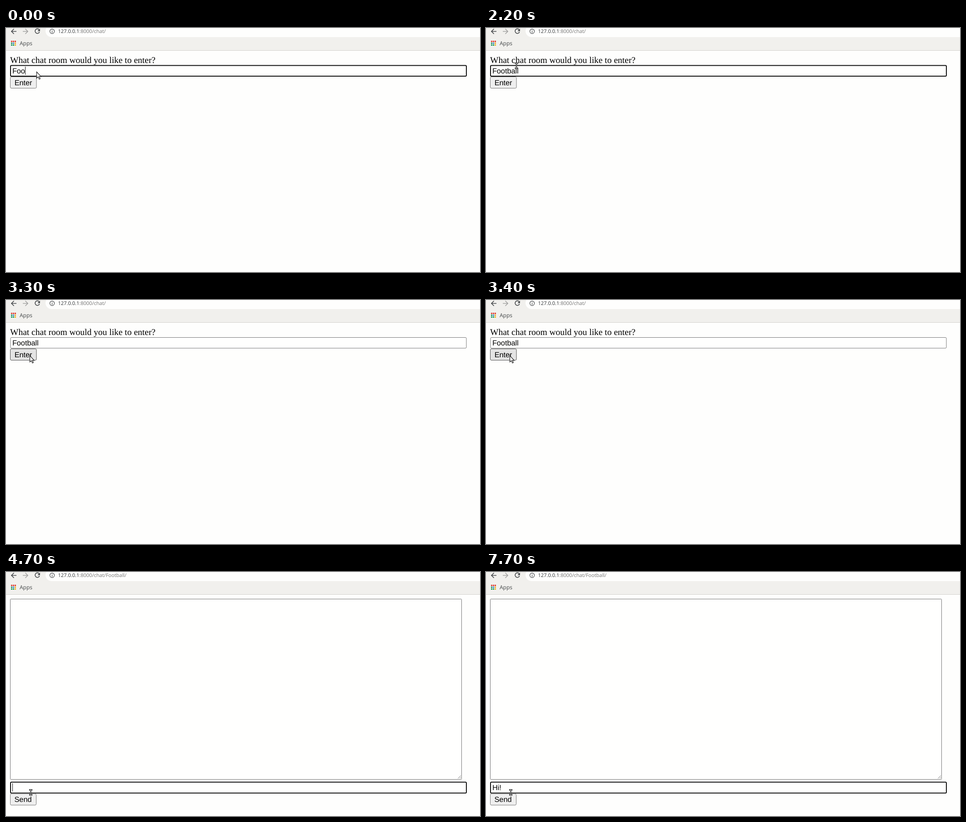
An HTML page that plays this animation: 1043 px wide and 537 px high, repeating every 8 s.

```html
<!DOCTYPE html>
<html lang="en">
<head>
<meta charset="utf-8">
<title>Chat room</title>
<style>
  html, body { margin: 0; width: 100%; height: 100%; overflow: hidden; background: #fefefd; }
  svg { display: block; width: 1043px; height: 537px; text-rendering: geometricPrecision; }
  .ui { font: 16.25px "Liberation Sans", Arial, sans-serif; }
  .bar { font: 11.05px "Open Sans", "Noto Sans", sans-serif; fill: #747474; }
  .box { fill: #fffffe; stroke: #767676; }
  .box.hover { stroke: #4f4f4f; }
  .box.focus { stroke: #101010; stroke-width: 2; }
  .button { fill: #efefef; stroke: #767676; }
  .button.hover { fill: #e4e4e4; stroke: #4f4f4f; }
  .icon { fill: none; stroke: #474a4d; stroke-width: 1.7; }
</style>
</head>
<body>
<svg viewBox="0 0 1043 537">
  <rect width="1043" height="49" fill="#f1f0ed"/>
  <path d="M0 49.5H1043" stroke="#d2d1ce"/>
  <rect x="87" y="-7" width="1000" height="27" rx="13.5" fill="#fefefd"/>
  <path class="icon" d="M23 7.5H12.5M17.5 2 12 7.5 17.5 13"/>
  <path class="icon" d="M37 7.5H47.5M42.500 2 48 7.5 42.500 13" style="stroke:#a3a3a2"/>
  <path class="icon" d="M73 3.800A5 5 0 1 0 73.800 8.500"/>
  <path d="M74.800 1.500V7H69.300Z" fill="#474a4d"/>
  <circle class="icon" cx="101.500" cy="7.300" r="5" style="stroke-width:1.200"/>
  <path class="icon" d="M101.500 4.200V5.600M101.500 6.600V10.500" style="stroke-width:1.300"/>
  <text class="bar" x="114.500" y="11"><tspan fill="#303336">127.0.0.1</tspan>:8000/chat/<tspan id="room"></tspan></text>
  <g id="apps"></g>
  <text class="bar" x="30" y="38.300" style="font-size:12px;fill:#45484a">Apps</text>

  <g id="lobby">
    <text x="9" y="77" style="font:19.5px 'Liberation Serif',Times,serif">What chat room would you like to enter?</text>
    <rect id="roomBox" x="10" y="82.500" width="1003" height="23.500" rx="2"/>
    <rect id="enter" x="9.500" y="107.500" width="57.500" height="25" rx="2.500"/>
    <text class="ui" x="18.700" y="126">Enter</text>
  </g>
  <g id="chat">
    <rect id="log" x="9.500" y="59.500" width="993" height="397" rx="1"/>
    <path d="M994.500 454.500 1001 448M998.500 454.500 1001 452" stroke="#777"/>
    <rect class="box focus" x="10" y="462.500" width="1003" height="24" rx="2"/>
    <rect class="button" x="9.500" y="488" width="57" height="25" rx="2.500"/>
    <text class="ui" x="18.500" y="506.300">Send</text>
  </g>
  <text id="typed" class="ui" x="13.900"></text>
  <rect id="caret" width="1" height="18" fill="#111"/>
  <path id="arrow" d="M.5.5V14.500L3.700 11.600 6.100 16.800 8.300 15.800 6 10.800H10Z" fill="#fff" stroke="#1c1c1c" stroke-width="1.200"/>
  <g id="beam" fill="none">
    <path d="M-3.500-5.500H3.500M0-5.500V5.500M-3.500 5.500H3.500" stroke="#222" stroke-width="2.800"/>
    <path d="M-2.600-5.500H2.600M0-5.500V5.500M-2.600 5.500H2.600" stroke="#ddd" stroke-width=".9"/>
  </g>
</svg>
<script>
const $ = id => document.getElementById(id);
const LOOP = 8000, PAGE_CHANGE = 3500;

// Each entry takes effect at its time and holds until the next.
const typing = [
  [0, "Foo"], [300, "Foot"], [1000, "Footb"], [1100, "Footba"], [1700, "Football"],
  [3500, ""], [5800, "H"], [6300, "Hi"], [7200, "Hi!"]
];
const caretShown = [
  [0, true], [2200, false], [2700, true], [3300, false], [3500, true], [4000, false],
  [4600, true], [5100, false], [5700, true], [7000, false], [7200, true], [7700, false]
];
const pointer = [
  [0, ["arrow", 67, 96]], [300, ["beam", 69, 98.5]],
  [2200, ["beam", 67, 83]], [2300, ["beam", 63, 91]], [2400, ["arrow", 58, 108]],
  [2500, ["arrow", 56, 117]], [2600, ["arrow", 55, 122]], [2700, ["arrow", 54, 128]],
  [2800, ["arrow", 53, 131]], [2900, ["arrow", 52, 126]], [3000, ["arrow", 52, 122]],
  [3500, ["beam", 53.5, 125.5]], [3800, ["beam", 153, 152]], [4000, ["beam", 56, 479]],
  [4200, ["beam", 54.5, 468]], [4400, ["beam", 54.5, 479]], [4700, ["beam", 54.5, 485]]
];
const at = (track, t) => track.findLast(([start]) => t >= start)[1];
const show = (id, on) => $(id).style.display = on ? "" : "none";
const setClass = (id, name) => $(id).setAttribute("class", name);

const red = "#dc4437", green = "#219b62", blue = "#3f83d8", yellow = "#eeb32f";
[red, red, red, green, blue, yellow, green, green, yellow].forEach((color, i) => {
  $("apps").innerHTML +=
    `<rect x="${11 + i % 3 * 4}" y="${28 + Math.floor(i / 3) * 4}" width="3" height="3" fill="${color}"/>`;
});

function render(t) {
  const inChat = t >= PAGE_CHANGE;
  show("lobby", !inChat);
  show("chat", inChat);
  $("room").textContent = inChat ? "Football/" : "";

  const [kind, x, y] = at(pointer, t);
  setClass("roomBox", t < 3300 ? "box focus" : "box");
  setClass("enter", kind === "arrow" && y > 107 ? "button hover" : "button");
  setClass("log", t < 4200 ? "box hover" : "box");

  const typed = $("typed");
  typed.textContent = at(typing, t);
  typed.setAttribute("y", inChat ? 480.3 : 100.2);
  const end = typed.textContent ? typed.getComputedTextLength() : 0;
  $("caret").setAttribute("x", Math.floor(14 + end));
  $("caret").setAttribute("y", inChat ? 465 : 85);
  show("caret", at(caretShown, t));

  show("arrow", kind === "arrow");
  show("beam", kind === "beam");
  $(kind).setAttribute("transform", `translate(${x} ${y})`);
}

const began = performance.now();
function tick() {
  render((performance.now() - began) % LOOP);
  requestAnimationFrame(tick);
}
tick();
</script>
</body>
</html>
```
